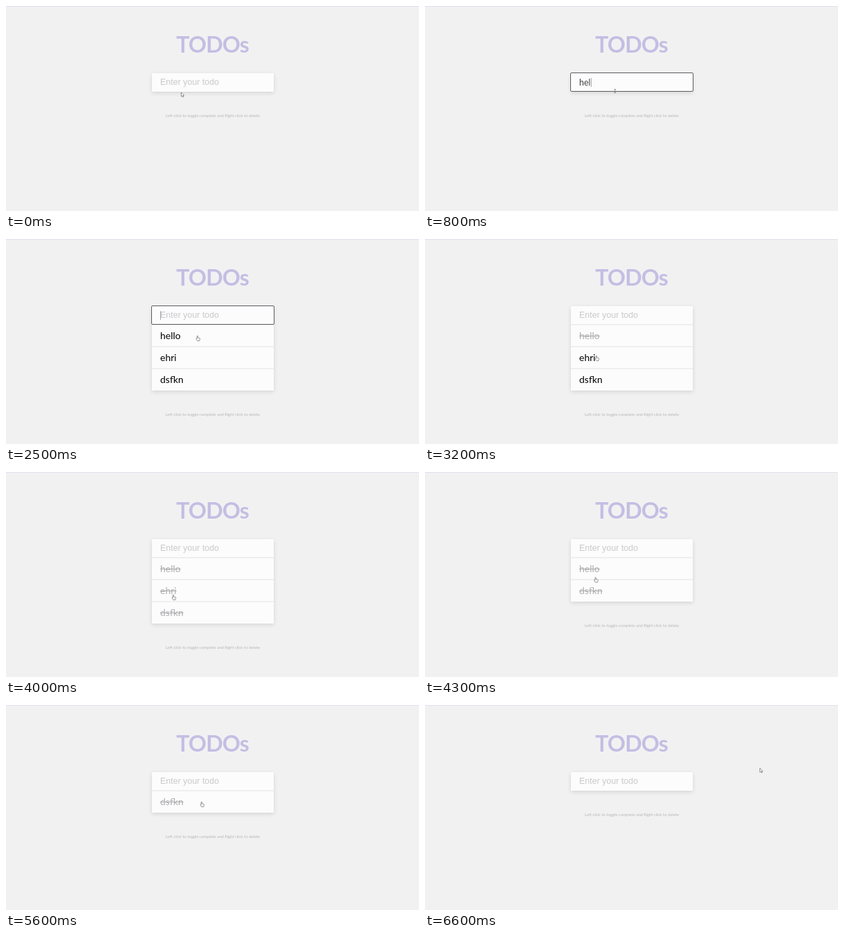
These frames come from a looping animation (600 px wide and 299 px high, 6.7 s). An HTML page:

```html
<!DOCTYPE html>
<html lang="en">
<head>
<meta charset="utf-8">
<title>Todos</title>
<style>
html, body { margin: 0; width: 100%; height: 100%; overflow: hidden; }
body { position: relative; background: #f2f1f2; font-family: Lato, sans-serif; }
body::before { content: ""; position: absolute; width: 600px; height: 1px; background: #e3dff0; }
h1, #hint, #form, #cursor, #caret { position: absolute; margin: 0; white-space: pre; }
h1 { top: 36px; width: 600px; text-align: center; font: 700 32.5px/40px Lato, sans-serif; letter-spacing: -.9px; color: #c4bee3; }
#form { left: 212px; top: 98px; width: 177px; padding-bottom: 1px; background: #fdfcfd; box-shadow: 0 2px 6px rgba(0, 0, 0, .12); }
#field { height: 26px; padding-left: 12px; font: 12.5px/27px Lato, sans-serif; color: #444; }
#field.empty { font-family: "Liberation Sans", Arial, sans-serif; color: #c9c8ca; }
#field.focus { outline: 1px solid #5c5c5e; border-radius: 1px; }
.row { height: 30px; padding-left: 12px; border-top: 2px solid #efeef0; font-size: 14px; line-height: 30px; color: #000; }
.row span { display: inline-block; height: 19px; line-height: 19px; }
.done span { color: #adacae; text-decoration: line-through 1px; }
.picked span { background: #3390f8; color: #fff; }
#hint { width: 601px; text-align: center; font-size: 5.93px; line-height: 8px; color: #b8b7b9; }
#caret { top: 105px; width: 1px; height: 13px; background: #a9a8b0; }
#cursor { left: 0; top: 0; width: 600px; height: 299px; }
#cursor path { fill: #fff; stroke: #555; stroke-width: .6; }
</style>
</head>
<body>
<h1>TODOs</h1>
<div id="form"><div id="field"></div><div id="list"></div></div>
<div id="hint">Left click to toggle complete and Right click to delete</div>
<div id="caret"></div>
<svg id="cursor"><path id="shape"/></svg>
<script>
const $ = id => document.getElementById(id);
const LOOP = 6700, STEP = 100;
const FOCUS = 100, HOVER = 2500, BLUR = 2600, LEAVE = 6500;
const shapes = {
  arrow: 'M-1.5-4V2L0 .8 1 3 2 2.5 1 .5H2.7Z',
  beam: 'M-1.3-2.5H1.3M0-2.5V2.5M-1.3 2.5H1.3',
  hand: 'M-1.5-3.5Q-.7-4.2-.2-3.5V-1L2.4-.5Q3-.2 2.8 1L2 3.5H-1L-2.8.5Q-2.6-.5-1.5.3Z'
};

// typed: first key, rate: letters per step, from/to: lifetime in the list
const todos = [
  { text: 'hello', typed: 600, rate: 1, from: 1200, to: 4400, clicks: [2700] },
  { text: 'ehri', typed: 1500, rate: 2, from: 1700, to: 4100, clicks: [3300] },
  { text: 'dsfkn', typed: 1900, rate: 2, from: 2200, to: LEAVE, clicks: [3600, 4500, 5200, 5900, 6300], picked: 4600, unpicked: 5200 }
];

// Pointer stops: time, x, y
const stops = [[0, 256, 130], [FOCUS, 276, 124], [HOVER - STEP, 276, 124], [HOVER, 279, 145],
  [2900, 250, 155], [3700, 250, 206], [4000, 244, 183], [4400, 250, 149], [4800, 253, 153],
  [5100, 291, 146], [5600, 285, 145], [5800, 345, 145], [LEAVE - STEP, 345, 145], [6600, 488, 96]];

const within = (t, a, b) => t >= a && t < b;

function locate(t) {
  const i = Math.max(1, stops.findIndex(s => s[0] >= t));
  const a = stops[i - 1], b = stops[i], u = (t - a[0]) / (b[0] - a[0]);
  return [1, 2].map(k => a[k] + (b[k] - a[k]) * u);
}

function typedText(t) {
  const todo = todos.find(d => within(t, d.typed, d.from));
  return todo ? todo.text.slice(0, ((t - todo.typed) / STEP + 1) * todo.rate) : '';
}

function rowHtml(d, t) {
  const done = d.clicks.filter(c => c <= t).length % 2;
  const picked = within(t, d.picked, d.unpicked);
  return `<div class="row ${done ? 'done' : ''} ${picked ? 'picked' : ''}"><span>${d.text}</span></div>`;
}

function draw(t) {
  const text = typedText(t), focus = within(t, FOCUS, BLUR);
  const field = $('field'), caret = $('caret');
  field.textContent = text || 'Enter your todo';
  field.className = (text ? '' : 'empty ') + (focus ? 'focus' : '');

  const range = document.createRange();
  range.selectNodeContents(field);
  const width = text ? range.getBoundingClientRect().width : 0;
  caret.hidden = !focus || within(t, 400, todos[0].typed);
  caret.style.left = 224 + Math.round(width) + 'px';

  const live = todos.filter(d => within(t, d.from, d.to));
  $('list').innerHTML = live.map(d => rowHtml(d, t)).join('');
  $('hint').style.top = 156 + 32 * live.length + 'px';

  const kind = !within(t, FOCUS, LEAVE) ? 'arrow' : t < HOVER ? 'beam' : 'hand';
  $('shape').setAttribute('d', shapes[kind]);
  $('shape').setAttribute('transform', `translate(${locate(t)})`);
}

let last = -1;
function tick() {
  const t = Math.floor(performance.now() % LOOP / STEP) * STEP;
  if (t != last) draw(last = t);
  requestAnimationFrame(tick);
}
tick();
</script>
</body>
</html>
```
